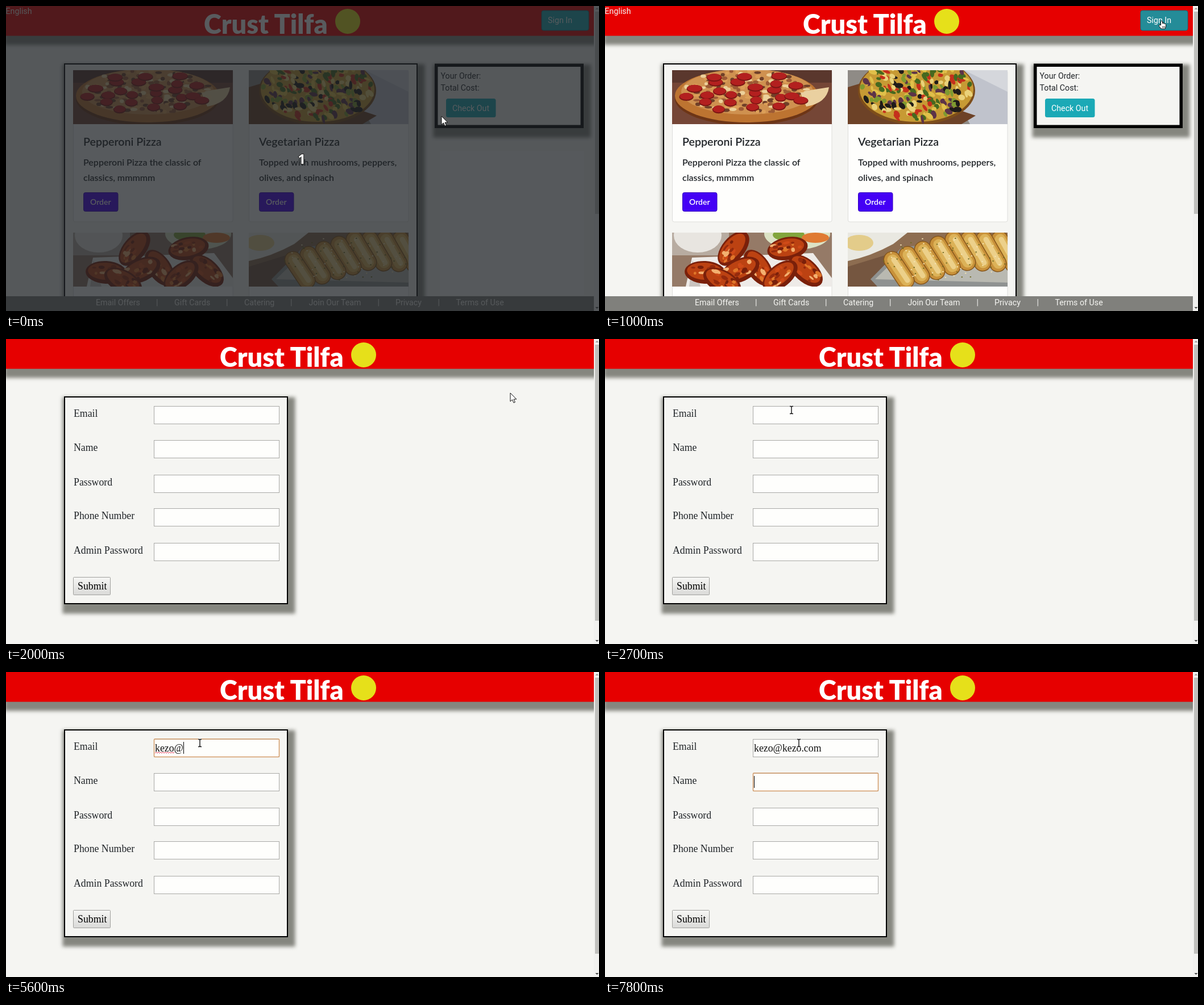
These frames come from a looping animation (1043x537 px, 8 s). An HTML page:

```html
<!DOCTYPE html>
<html lang="en">
<head>
<meta charset="utf-8">
<title>Pizza order</title>
<style>
html, body { margin: 0; width: 100%; height: 100%; overflow: hidden; background: #f5f5f2; }
#stage { display: block; position: absolute; left: 0; top: 0; }
text { white-space: pre; }
.ui { font: 14.22px Roboto, sans-serif; }
.form { font: 17.78px "Liberation Serif", serif; }
.hand { font-family: Lato, sans-serif; font-weight: 600; }
.brand { font: 900 46.8px Lato, sans-serif; }
.status { font: 12.3px "Open Sans", sans-serif; }
.blur { filter: blur(3.2px); }
</style>
</head>
<body>
<svg id="stage" width="1043" height="537" viewBox="0 0 1043 537"></svg>
<script>
const BG = '#f5f5f2', INK = '#212529', TEAL = '#1ba9b6';
const LOOP = 8000, STEP = 100;

const rect = (x, y, w, h, fill, more = '') =>
  `<rect x="${x}" y="${y}" width="${w}" height="${h}" fill="${fill}" ${more}/>`;
const oval = (x, y, rx, ry, fill, more = '') =>
  `<ellipse cx="${x}" cy="${y}" rx="${rx}" ry="${ry}" fill="${fill}" ${more}/>`;
const path = (d, fill, more = '') => `<path d="${d}" fill="${fill}" ${more}/>`;
const text = (x, y, str, cls, fill = INK, more = '') =>
  `<text x="${x}" y="${y}" class="${cls}" fill="${fill}" ${more}>${str}</text>`;
const photo = (x, y, body) =>
  `<svg x="${x}" y="${y}" width="281" height="95" overflow="hidden">${body}</svg>`;

function random(seed) {
  return () => {
    seed = (seed * 16807) % 2147483647;
    return seed / 2147483647;
  };
}

// Soft drop shadow shared by the header and the framed boxes.
const shadow = (x, y, w, h) =>
  rect(x - 2.5, y + 1.5, w + 15, h + 15, '#85867f', 'class="blur"');

function frame(x, y, w, h, b) {
  return shadow(x, y, w, h) +
    rect(x + b / 2, y + b / 2, w - b, h - b, BG, `stroke="#000" stroke-width="${b}"`);
}

// Toppings spread evenly over an oval.
function scatter(seed, n, cx, cy, rx, ry, draw) {
  const rnd = random(seed);
  let out = '';
  for (let i = 0; i < n; i++) {
    const r = Math.sqrt((i + 0.5) / n), a = i * 2.4 + rnd() * 0.5;
    out += draw(cx + rx * r * Math.cos(a), cy + ry * r * Math.sin(a), rnd, i);
  }
  return out;
}

function pepperoni() {
  return rect(0, 0, 281, 95, '#754636') + rect(0, 0, 281, 22, '#5a372d') +
    oval(131, 50, 126, 47, '#6d3516') + oval(131, 45, 126, 47, '#bd7431') +
    oval(132, 38, 116, 40, '#cf9150') +
    path('M225 38L276 30Q272 58 236 64Z', '#ead0a0') +
    scatter(31, 170, 132, 38, 112, 38, (x, y, r, i) =>
      oval(x, y, 3 + 4 * r(), 2 + 2 * r(), ['#9c5a35', '#ecd09a', '#6f4029', '#dc9f58'][i % 4])) +
    scatter(9, 24, 130, 40, 110, 36, (x, y, r) => {
      const w = 9 + 4 * r();
      return oval(x, y + 1, w + 1, 7, '#7a1614') + oval(x, y, w, 6, '#b3201f');
    });
}

function veggie() {
  return rect(0, 0, 281, 95, '#8f8b86') +
    path('M160 0H281V95H215Z', '#c0c3cc') + path('M205 0L281 38V0Z', '#d5d7dc') +
    path('M0 30L40 18L225 80L200 95H0Z', '#6d4227') +
    oval(121, 36, 103, 60, '#7d4d1a') + oval(121, 34, 100, 57, '#c79a34') +
    scatter(17, 210, 121, 34, 96, 54, (x, y, r, i) =>
      oval(x, y, 3 + 5 * r(), 2 + 3 * r(),
        ['#e0c04a', '#46691f', '#c5301c', '#ead27a', '#1f1b19', '#7f9a30', '#5c3348'][i % 7],
        `transform="rotate(${Math.round(r() * 90)} ${x} ${y})"`));
}

function wings() {
  const spots = [[108, 28], [58, 70], [152, 62], [203, 28], [235, 67], [120, 66], [88, 86], [190, 76]];
  const tints = ['#e0762a', '#7a200a', '#cf4a18', '#f3b070', '#952b0d'];
  const rnd = random(5);
  return rect(0, 0, 281, 95, '#957a67') + rect(0, 0, 100, 40, '#b8aca1') +
    oval(45, 5, 42, 30, '#e8e5e0') + oval(220, 2, 58, 28, '#dce3c5') +
    oval(205, 4, 28, 11, '#82a53d') + oval(252, 9, 24, 9, '#e07a32') +
    path('M35 44L248 36L281 80V95H24Z', '#eeebe8') + path('M36 48L50 95H30Z', '#c9c3bf') +
    spots.map(([x, y], i) => {
      const turn = `transform="rotate(${i * 53 % 120 - 50} ${x} ${y})"`;
      let out = oval(x, y, 36, 20, '#7a200a', turn) + oval(x - 1, y - 2, 31, 15, '#bc4212', turn);
      for (let k = 0; k < 15; k++)
        out += oval(x - 24 + rnd() * 46, y - 12 + rnd() * 23, 2 + rnd() * 5, 1.5 + rnd() * 2.5,
          tints[k % 5], turn);
      return out;
    }).join('');
}

function breadsticks() {
  let out = rect(0, 0, 281, 95, '#8d6d51') + path('M0 60L130 20V95H0Z', '#755640') +
    path('M0 0H105L80 20Q40 42 0 50Z', '#e9e8e1') + oval(20, 18, 25, 14, '#e3cc8a') +
    path('M40 82L96 25L281 12V95H52Z', '#8f9291') + path('M48 82L100 32L281 24V88Z', '#b9b9b1');
  for (let i = 7; i >= 0; i--) {
    const x = 78 + i * 27, y = Math.max(12, 48 - i * 9);
    const line = (c, w, dx = 0) => path(`M${x + dx} ${y}L${x + dx + 24} ${y + 36 + i}`, 'none',
      `stroke="${c}" stroke-width="${w}" stroke-linecap="round"`);
    out += line('#86561c', 31) + line('#c8913a', 28) + line('#dcb258', 19, 1) + line('#ecd08a', 9, 3);
  }
  return out + scatter(13, 90, 170, 46, 110, 38, (x, y, r, i) =>
    oval(x, y, 1.4, 1, i % 2 ? '#6f6a24' : '#f5e5b5'));
}

function card(x, y, pic, title = '', lines = []) {
  return rect(x + .5, y + .5, 280.5, 266.5, '#fefefc', 'rx="3" stroke="#dededb"') + photo(x, y, pic) +
    text(x + 18, y + 133, title, 'hand', INK, 'font-size="19.6"') +
    lines.map((s, i) => text(x + 18, y + 168 + i * 27, s, 'hand', INK, 'font-size="16"')).join('') +
    rect(x + 18.5, y + 215.5, 60.5, 33, '#4400f5', 'rx="3" stroke="#3400bd"') +
    text(x + 30, y + 237, 'Order', 'hand', '#fff', 'font-size="14"');
}

const header = (x, y) => shadow(0, 0, 1034, 52) + rect(0, 0, 1034, 52.5, '#e60000') +
  text(x, 49, 'Crust Tilfa', 'brand', '#fff') + oval(x + 253, y, 22, 22, '#e6e01a');

const scrollbar = end => rect(1034, 0, 9, 537, '#f1f1ef') +
  rect(1036, 10, 7, end - 10, '#c0c0bd') +
  path('M1036.5 6L1039.5 3L1042.5 6Z', '#999') + path('M1036.5 530L1039.5 533L1042.5 530Z', '#444');

function menuPage() {
  const links = [[158, 'Email Offers'], [296, 'Gift Cards'], [419, 'Catering'],
    [532.5, 'Join Our Team'], [685, 'Privacy'], [791.5, 'Terms of Use']];
  return rect(0, 0, 1043, 537, BG) + header(348, 27) +
    text(-0.5, 14, 'English', 'ui', '#f5f5f2') +
    rect(942, 8, 83, 35, TEAL, 'id="signIn" rx="3.5" stroke="#126f7a"') +
    text(953, 30, 'Sign In', 'ui', '#fff') +
    frame(102, 101, 622, 500, 2) +
    card(118, 113, pepperoni(), 'Pepperoni Pizza', ['Pepperoni Pizza the classic of', 'classics, mmmmm']) +
    card(427, 113, veggie(), 'Vegetarian Pizza', ['Topped with mushrooms, peppers,', 'olives, and spinach']) +
    card(118, 399, wings()) + card(427, 399, breadsticks()) +
    frame(754, 101.5, 262, 113.5, 5.5) +
    text(764.5, 127.5, 'Your Order:', 'ui') + text(764.5, 148.5, 'Total Cost:', 'ui') +
    rect(774, 163, 87.5, 33, TEAL, 'rx="3.5"') + text(785, 185, 'Check Out', 'ui', '#fff') +
    rect(0, 511, 1034, 26, '#80807c') +
    links.map(([x, s]) => text(x, 527, s, 'ui', '#f5f5f2')).join('') +
    [264, 387, 500, 653.5, 759.5].map(x => text(x, 526.5, '|', 'ui', '#f5f5f2')).join('') +
    scrollbar(366);
}

const fieldY = [118.5, 178.5, 239.5, 298.5, 359.5];

function formPage() {
  const labels = ['Email', 'Name', 'Password', 'Phone Number', 'Admin Password'];
  return rect(0, 0, 1043, 537, BG) + header(376, 28) + frame(102, 101, 394, 366, 2) +
    labels.map((s, i) => text(119, fieldY[i] + 18.5, s, 'form') +
      rect(260.5, fieldY[i], 220, 31, '#fefefc', 'stroke="#a9a9a6"')).join('') +
    `<linearGradient id="grey" x2="0" y2="1"><stop stop-color="#f6f6f4"/>
     <stop offset="1" stop-color="#dadad8"/></linearGradient>` +
    rect(118.5, 419.5, 65, 31, 'url(#grey)', 'rx="1" stroke="#a0a09d"') +
    text(126, 441, 'Submit', 'form', '#000') +
    rect(260.5, 0, 220, 31.5, 'none', 'id="focus" rx="1.5" stroke="#d29a68" stroke-width="1.5"') +
    text(262, 140, '', 'form', '#111', 'id="typed"') +
    path('', 'none', 'id="squiggle" stroke="#e0405a"') +
    rect(262, 123, 1, 21, '#000', 'id="caret"') +
    `<g id="status">${rect(-.5, 519.5, 347.5, 20, '#f1f1ef', 'rx="2" stroke="#d0d0cd"')}
     ${text(3, 533, 'Waiting for localhost…', 'status', '#6a6c6c')}</g>` +
    scrollbar(496);
}

const edge = 'stroke="#111" stroke-width="1" stroke-linejoin="round"';
const beam = 'M-3-6.5H-1L0-5.5L1-6.5H3M0-5.5V5.5M-3 6.5H-1L0 5.5L1 6.5H3';
const cursors = {
  arrow: path('M0 0V15L3.5 11.8L6 17.3L8.4 16.2L6 11H10.8Z', '#fff', edge),
  hand: path('M-1.5 8V1.2Q0-.8 1.5 1.2V5Q3-.2+3.2 5Q4.6 3.8 5.2 5.5Q6.8 4.5 7.5 6.5V10L6.3 14H-1L-4.5 9.5Q-5 6.8-3 7Z', '#fff', edge) +
    path('M1.5 10V12M3.5 10V12M5.3 10V12', 'none', edge),
  beam: path(beam, 'none', 'stroke="#fff" stroke-width="3"') +
    path(beam, 'none', 'stroke="#111" stroke-width="1.4"')
};

const stage = document.getElementById('stage');
stage.innerHTML = `<g id="menu">${menuPage()}</g><g id="form">${formPage()}</g>
  <g id="dim">${rect(0, 0, 1043, 537, 'rgba(30,34,39,.74)')}
  ${text(520, 278, '1', '', '#fff', 'font-family="Open Sans, sans-serif" font-weight="700" font-size="24" text-anchor="middle" stroke="#222" stroke-width="2" paint-order="stroke"')}</g>` +
  Object.entries(cursors).map(([k, s]) => `<g id="${k}">${s}</g>`).join('');

const el = id => document.getElementById(id);
const show = (id, on) => el(id).setAttribute('display', on ? 'inline' : 'none');

// Pointer stops: time, x, y.
const track = [[0, 766, 194], [100, 767, 193], [300, 798, 166], [700, 938, 58], [900, 977, 28],
  [1000, 979, 26], [1100, 979, 26], [1300, 952, 48], [1600, 889, 93], [1900, 889, 93],
  [2000, 887, 95], [2200, 887, 95], [2400, 610, 112], [2600, 233, 124], [2700, 328, 125], [2800, 341, 125]];
const shapes = [[0, 'arrow'], [100, 'hand'], [200, 'arrow'], [900, 'hand'], [1200, 'arrow'], [2700, 'beam']];
const keys = [4800, 5000, 5100, 5300, 5600, 6200, 6400, 6500, 6800, 7100, 7500, 7600, 7700];
const address = 'kezo@kezo.com';
const caretOn = [[2900, 3400], [4500, 4600], [4800, LOOP]];

function pointer(t) {
  const i = track.findIndex(p => p[0] > t);
  if (i < 0) return track[track.length - 1].slice(1);
  const a = track[i - 1], b = track[i], k = (t - a[0]) / (b[0] - a[0]);
  return [1, 2].map(n => Math.round(a[n] + (b[n] - a[n]) * k));
}

function wave(x, end) {
  let d = `M${x} 143`;
  for (let i = 1; x + i * 2 <= end; i++) d += `L${x + i * 2} ${i % 2 ? 141 : 143}`;
  return d;
}

function draw(t) {
  show('menu', t < 1100);
  show('form', t >= 1100);
  show('dim', t < 100);
  show('status', t < 1400);
  el('signIn').setAttribute('fill', t >= 900 ? '#248c98' : TEAL);

  const [x, y] = pointer(t);
  const shape = shapes.filter(s => s[0] <= t).pop()[1];
  for (const k in cursors) show(k, k === shape);
  el(shape).setAttribute('transform', `translate(${x} ${y})`);

  const left = t >= 7800;
  const typed = el('typed'), n = keys.filter(k => k <= t).length;
  typed.textContent = address.slice(0, n);
  const width = n ? typed.getComputedTextLength() : 0;
  show('focus', t >= 2900);
  el('focus').setAttribute('y', fieldY[left ? 1 : 0] - .5);
  show('caret', caretOn.some(([a, b]) => t >= a && t < b));
  el('caret').setAttribute('x', left ? 262 : Math.round(262 + width));
  el('caret').setAttribute('y', left ? 183 : 123);
  show('squiggle', t >= 5600 && !left);
  el('squiggle').setAttribute('d', wave(262, 296) + (t >= 7300 ? wave(312, 346) : ''));
}

const start = performance.now();
let last = -1;
function tick() {
  const t = Math.floor((performance.now() - start) % LOOP / STEP) * STEP;
  if (t !== last) draw(last = t);
  requestAnimationFrame(tick);
}
tick();
</script>
</body>
</html>
```
